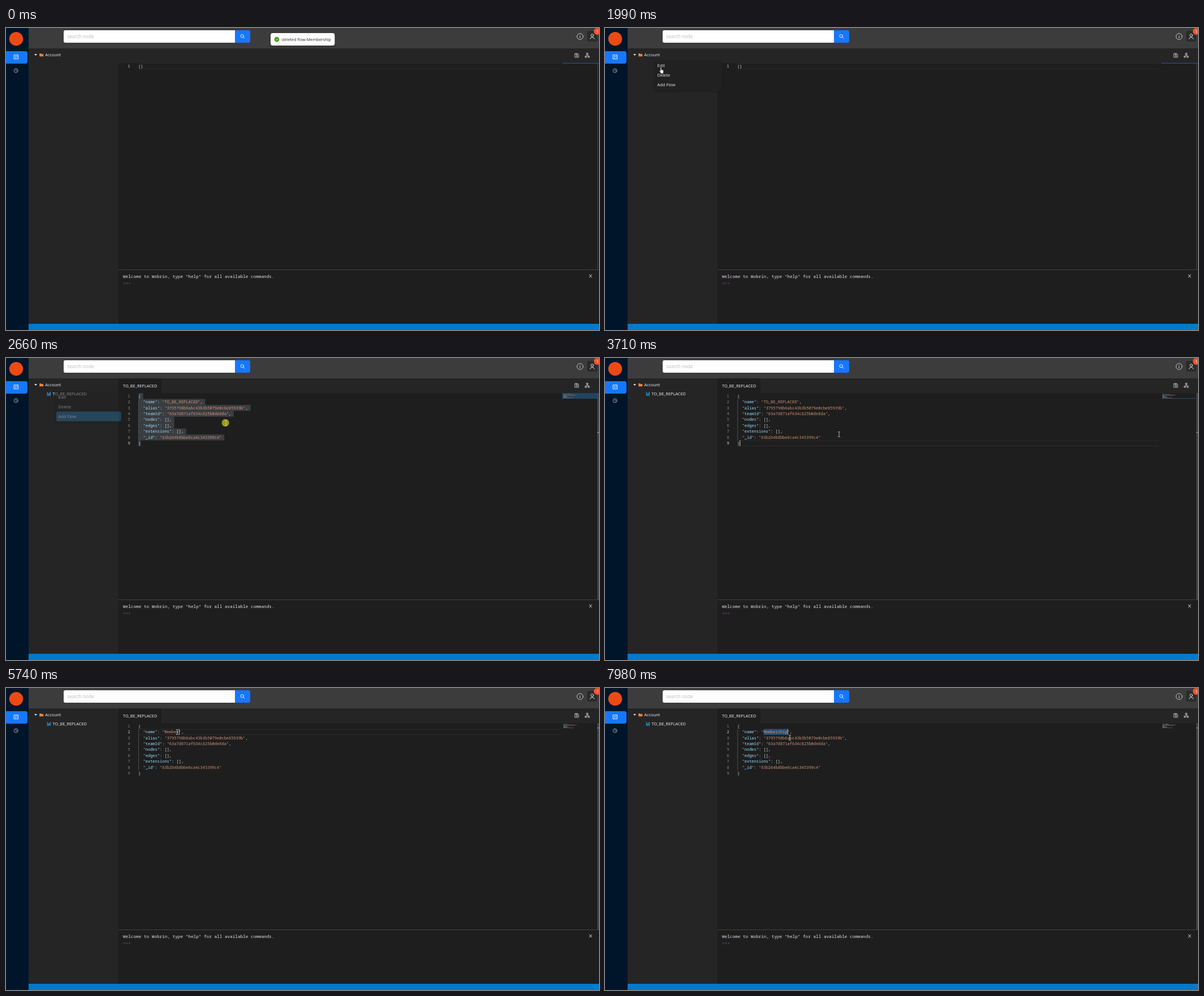
These frames come from a looping animation (1049 px wide and 534 px high, 8 s). An HTML page:

```html
<!DOCTYPE html>
<html lang="en">
<head>
<meta charset="utf-8">
<title>Flow editor</title>
<style>
  html, body { margin: 0; width: 100%; height: 100%; overflow: hidden; background: #1e1e1e; }
  svg { display: block; position: absolute; left: 0; top: 0; }
  text { font: 7.4px "Noto Sans", "Open Sans", sans-serif; fill: #e4e4e4; white-space: pre; }
  .mono { font: 7.03px "Noto Sans Mono", "DejaVu Sans Mono", monospace; fill: #d4d4d4; }
  .term { font-size: 7.7px; }
  .num { fill: #858585; text-anchor: end; }
  .num.on { fill: #d0d0c8; }
  .key { fill: #9cdcfe; }
  .str { fill: #ce9178; }
  .pun { fill: #d4d4d4; }
  .line { fill: none; stroke: #d0d0d0; stroke-width: .9; stroke-linecap: round; stroke-linejoin: round; }
</style>
</head>
<body>
<svg width="1049" height="534" viewBox="0 0 1049 534">
  <!-- panels -->
  <rect width="1049" height="534" fill="#1e1e1e"/>
  <rect x="40" width="1009" height="36" fill="#3c3c3c"/>
  <rect x="40" y="36" width="159" height="487" fill="#252526"/>
  <rect x="199" y="36" width="850" height="26" fill="#252526"/>
  <rect x="199" y="427" width="850" height="1" fill="#424242"/>
  <rect x="40" y="523" width="1009" height="11" fill="#007acc"/>

  <!-- navigation -->
  <rect width="40" height="534" fill="#001529"/>
  <circle cx="18" cy="19.2" r="12.2" fill="#eb4a14"/>
  <rect x="-4" y="41" width="42" height="22" rx="4" fill="#1677ff"/>
  <g class="line" style="stroke:#fff">
    <rect x="14.5" y="47.7" width="7" height="7"/>
    <path d="M16.8 49.6v3.4M19.2 49.6v2.2"/>
  </g>
  <g class="line" style="stroke:#a3abb3">
    <circle cx="17.7" cy="75.4" r="3.5"/>
    <path d="M17.7 73.5v2.1l1.5.9"/>
  </g>

  <!-- search -->
  <path d="M105 4H405V26H105a3 3 0 0 1-3-3V7a3 3 0 0 1 3-3z" fill="#fff"/>
  <path d="M405 4h24a3 3 0 0 1 3 3v16a3 3 0 0 1-3 3h-24z" fill="#1677ff"/>
  <text x="108.3" y="18" style="font-size:8.2px;fill:#bfbfbf">search node</text>
  <g class="line" style="stroke:#fff"><circle cx="417.7" cy="14.2" r="2.7"/><path d="M419.8 16.3l2.2 2.2"/></g>

  <!-- account tools -->
  <g class="line">
    <circle cx="1015.5" cy="15" r="5.4"/>
    <path d="M1015.5 14.4v3.4M1015.5 12.2v.2"/>
  </g>
  <rect x="1028" y="5" width="18" height="19" rx="3" fill="#2b2b2b"/>
  <g class="line" style="stroke:#eee"><circle cx="1037" cy="13" r="2.3"/><path d="M1033.2 19.4a3.9 3.9 0 0 1 7.6 0"/></g>
  <circle cx="1045.8" cy="6" r="6" fill="#f5532d"/>
  <text x="1043.9" y="8.7" style="fill:#fff">1</text>
  <g class="line">
    <path d="M1006.7 45.2h4.6l1.6 1.6v5h-6.2zM1008.4 45.4v1.8h2.4v-1.8"/>
    <circle cx="1009.8" cy="49.4" r=".9"/>
    <rect x="1027.2" y="44.6" width="2.4" height="2.2"/>
    <rect x="1024.8" y="49.8" width="2.2" height="2.2"/>
    <rect x="1029.8" y="49.8" width="2.2" height="2.2"/>
    <path d="M1028.4 46.8v1.4M1025.9 49.6l2.5-1.4 2.5 1.4"/>
  </g>

  <!-- tree -->
  <path d="M50 46h5l-2.5 3z" fill="#e4e4e4"/>
  <path d="M59.2 45h2.8l.8 1h3.4v4.2h-7z" fill="#e8833a"/>
  <text x="69.2" y="50.2">Account</text>

  <!-- new flow -->
  <g id="flow">
    <path d="M73.3 60v6h6M75 62.6v2.6M76.7 61.6v3.6M78.4 60v5.2" fill="none" stroke="#2b9bdc" stroke-width="1.1"/>
    <text x="82.6" y="65.5" style="font-size:7.3px">TO_BE_REPLACED</text>
    <rect x="199" y="36" width="76" height="26" fill="#1e1e1e"/>
    <text x="207" y="51.8" style="font-size:7.3px">TO_BE_REPLACED</text>
    <rect x="1046" y="62" width="3" height="365" fill="#424242"/>
  </g>
  <rect x="1046" y="62" width="1" height="365" fill="#484848"/>

  <!-- editor -->
  <g id="back"></g>
  <g id="code"></g>
  <rect id="caret" width="1" height="10.4" fill="#c8c8c8"/>
  <g id="map"></g>
  <g id="tip">
    <rect x="277.3" y="56.5" width="74" height="15.6" fill="#252526" stroke="#454545" stroke-width=".8"/>
    <text x="281.5" y="67" style="fill:#ccc">Name of this flow</text>
  </g>

  <!-- terminal -->
  <text class="mono term" x="207" y="442.2" style="fill:#e2e2e2">Welcome to Wobrin, type "help" for all available commands.</text>
  <text class="mono term" x="207" y="454.2" style="fill:#83548c">&gt;&gt;&gt;</text>
  <path class="line" style="stroke:#e8e8e8" d="M1032 436l4.2 5M1036.2 436l-4.2 5"/>

  <!-- context menu -->
  <g id="menu">
    <rect x="85" y="57" width="123" height="57" rx="4" fill="#000" opacity=".12"/>
    <rect x="86" y="57" width="121" height="55" rx="3" fill="#212122"/>
    <rect id="hover" x="89" y="92.3" width="114.5" height="17" rx="2" fill="#28698f"/>
    <text x="92.6" y="69.4">Edit</text>
    <text x="92.6" y="86.4">Delete</text>
    <text x="92.6" y="103.4">Add Flow</text>
  </g>

  <!-- toast -->
  <g id="toast">
    <rect x="466" y="9" width="117" height="26" rx="5" fill="#000" opacity=".1"/>
    <rect x="468" y="9" width="113.5" height="22" rx="4" fill="#fff"/>
    <circle cx="479" cy="20.2" r="4.4" fill="#4c9a1e"/>
    <path d="M477 20.3l1.5 1.5 2.5-3" fill="none" stroke="#fff" stroke-width=".9"/>
    <text x="488" y="22.8" style="font-size:7.25px;fill:#333">deleted flow Membership</text>
  </g>

  <!-- pointer -->
  <circle id="ring" r="6.6" fill="#b4ad14" opacity=".85"/>
  <g id="arrow"><path d="M0 0v8.6l2-1.8 1.4 3.2 1.5-.7-1.4-3.1h2.7z" fill="#fff" stroke="#111" stroke-width=".5"/></g>
  <g id="hand"><path d="M-.8.6a.9.9 0 0 1 1.8 0V4l3 .8q1 .4.9 1.5L4.3 9.6V11H-.4v-1.2L-2.6 6.6q-.3-1.2.8-1l1 1z" fill="#fff" stroke="#111" stroke-width=".6"/></g>
  <g id="beam"><path d="M-1.9-4.4h1.4l.5.4.5-.4h1.4M0-4v8M-1.9 4.4h1.4l.5-.4.5.4h1.4" fill="none" stroke="#c4c4c4" stroke-width=".9"/></g>
</svg>
<script>
const LOOP = 8000, CH = 4.218, ROW = 10.44, LEFT = 234.3, TOP = 62;
const NAME_COL = 11, OLD_NAME = 'TO_BE_REPLACED', NEW_NAME = 'Membership';
const LOADED = 2460, DESELECT = 3450, CLICK = 4080, PICK = 4270, REPICK = 7780;
const KEYSTROKES = [4980, 5180, 5230, 5380, 5590, 5740, 6300, 6460, 6510, 6660];
const BLINKS = [DESELECT, CLICK, PICK, ...KEYSTROKES, 7570, REPICK];
// click marks: from, to
const CLICKS = [[2400, 2520], [2620, 2760], [3430, 3560], [4060, 4160], [4270, 4430], [7570, 7800]];
// pointer: time, x, y, shape
const PATH = [
  [50, 165, 108, 'arrow'], [350, 122, 85, 'arrow'], [880, 186.3, 51.8, 'arrow'],
  [1150, 120, 76, 'arrow'], [1400, 68, 47, 'hand'], [1650, 86, 52, 'hand'],
  [1740, 86, 52, 'hand'], [1990, 98.8, 69.7, 'hand'], [2250, 109, 100, 'hand'],
  [2460, 110, 100, 'hand'], [2540, 215, 107, 'beam'], [2650, 389, 115, 'beam'],
  [2900, 389, 115, 'beam'], [3300, 430, 172, 'beam'], [3500, 430, 172, 'beam'],
  [3710, 414, 135, 'beam'], [4050, 302.6, 78, 'beam'], [7500, 302.6, 78, 'beam'],
  [7570, 301, 78, 'beam'], [7780, 302, 78, 'beam'], [7980, 327, 88, 'beam']
];
const COLOR = { key: '#5f8aa0', str: '#8a6350', pun: '#777' };

const $ = id => document.getElementById(id);
const show = (id, on) => $(id).style.display = on ? '' : 'none';
const clamp = v => Math.max(0, Math.min(1, v));
const span = (t, a, b) => clamp((t - a) / (b - a));
const within = (t, a, b) => t >= a && t < b;
const colX = col => LEFT + CH * col;
const rowY = row => TOP + ROW * row;
const rect = (x, y, w, h, fill) =>
  `<rect x="${x}" y="${y}" width="${w}" height="${h}" fill="${fill}"/>`;

const source = name => ['{',
  `  "name": "${name}",`,
  '  "alias": "3795798b6abc43b3b5079e0cbe85939b",',
  '  "teamId": "63a7d871af634c825b0de8da",',
  '  "nodes": [],', '  "edges": [],', '  "extensions": [],',
  '  "_id": "63b264b8bbe6ca4c345399c4"', '}'];

// split a line into [kind, text, column]
const tokens = line => [...line.matchAll(/"[^"]*"|[^"\s]+/g)].map(m => [
  m[0][0] !== '"' ? 'pun' : line[m.index + m[0].length] === ':' ? 'key' : 'str', m[0], m.index]);

function stateAt(t) {
  const typed = KEYSTROKES.filter(k => k <= t).length;
  const name = typed ? NEW_NAME.slice(0, typed) : OLD_NAME;
  const loaded = t >= LOADED;
  const all = within(t, LOADED, DESELECT);
  const word = within(t, PICK, KEYSTROKES[0]) || t >= REPICK;
  const row = !loaded ? 0 : t < CLICK ? 8 : 1;
  let col = 1;
  if (row === 1) {
    const inside = t < PICK || within(t, 7570, REPICK);
    col = NAME_COL + (inside ? 5 : name.length);
  }
  return { name, loaded, all, word, row, col };
}

function drawEditor(s) {
  const lines = s.loaded ? source(s.name) : ['{}'];
  let back = '', code = '', map = '';
  if (!s.all && !s.word) {
    for (const y of [rowY(s.row), rowY(s.row + 1) - .8]) back += rect(LEFT, y, 746, .9, '#2c2c2c');
  }
  if (s.all) {
    lines.forEach((l, i) => back += rect(LEFT, rowY(i), CH * (l.length + (i < 8 ? 1 : 0)), ROW + .1, '#3a3d41'));
    map += rect(984, 62, 62, 10, '#21435f');
  }
  if (s.word) {
    back += rect(colX(NAME_COL), rowY(1), CH * s.name.length, ROW, '#264f78');
    map += rect(991, 63.4, .54 * s.name.length, 1.2, '#2f6699');
  }
  if (s.loaded) back += rect(LEFT, rowY(1), .8, ROW * 7, '#5a5a5a');
  if (!s.loaded) map += rect(984, 61.9, 65, 1, '#2b559b');
  else if (s.row === 8 && !s.all) map += rect(985, 71.1, 60, 1, '#20506f');

  lines.forEach((l, i) => {
    const y = rowY(i) + 7.7;
    const on = i === s.row ? ' on' : '';
    code += `<text class="mono num${on}" x="219.6" y="${y}">${i + 1}</text>`;
    const body = tokens(l).map(([kind, text, at], n, list) => {
      const end = n ? list[n - 1][2] + list[n - 1][1].length : 0;
      return ' '.repeat(at - end) + `<tspan class="${kind}">${text}</tspan>`;
    }).join('');
    code += `<text class="mono" x="${LEFT - .2}" y="${y}">${body}</text>`;
    if (s.loaded) for (const [kind, text, at] of tokens(l))
      map += rect(985 + .54 * at, 62.6 + 1.1 * i, .54 * text.length, .65, COLOR[kind]);
  });
  if (s.loaded) map += rect(1046, s.row === 8 ? 131 : 70, 3, 1.2, '#a0a0a0');
  $('back').innerHTML = back;
  $('code').innerHTML = code;
  $('map').innerHTML = map;
}

function drawPointer(t) {
  let i = PATH.findIndex(p => p[0] > t) - 1;
  if (i === -2) i = PATH.length - 1;
  const a = PATH[Math.max(0, i)], b = PATH[Math.min(PATH.length - 1, i + 1)];
  const p = b[0] > a[0] ? span(t, a[0], b[0]) : 0;
  const e = p * p * (3 - 2 * p);
  const x = a[1] + (b[1] - a[1]) * e, y = a[2] + (b[2] - a[2]) * e;
  for (const id of ['arrow', 'hand', 'beam']) {
    show(id, i >= 0 && a[3] === id);
    $(id).setAttribute('transform', `translate(${x} ${y})`);
  }
  show('ring', CLICKS.some(c => within(t, ...c)));
  $('ring').setAttribute('transform', `translate(${x - .8} ${y - .3})`);
}

let last = '';
function render(t) {
  const s = stateAt(t), id = JSON.stringify(s);
  if (id !== last) drawEditor(s);
  last = id;

  const blink = BLINKS.filter(b => b <= t).pop();
  show('caret', blink !== undefined && (t - blink) % 1000 < 505);
  $('caret').setAttribute('x', colX(s.col) - .2);
  $('caret').setAttribute('y', rowY(s.row));
  show('flow', s.loaded);

  const out = span(t, 640, 900);
  $('toast').style.opacity = 1 - out;
  $('toast').setAttribute('transform', `translate(0 ${-4.4 * out})`);

  const leave = span(t, 2560, 2760);
  $('menu').style.opacity = span(t, 1740, 1880) * (1 - leave);
  $('menu').setAttribute('transform', `translate(0 ${5 * leave})`);
  show('hover', t >= 2200);

  $('tip').style.opacity = t < KEYSTROKES[0] ? span(t, 4720, 4840) : 0;
  drawPointer(t);
}

const start = performance.now();
function tick() {
  render((performance.now() - start) % LOOP);
  requestAnimationFrame(tick);
}
tick();
</script>
</body>
</html>
```
